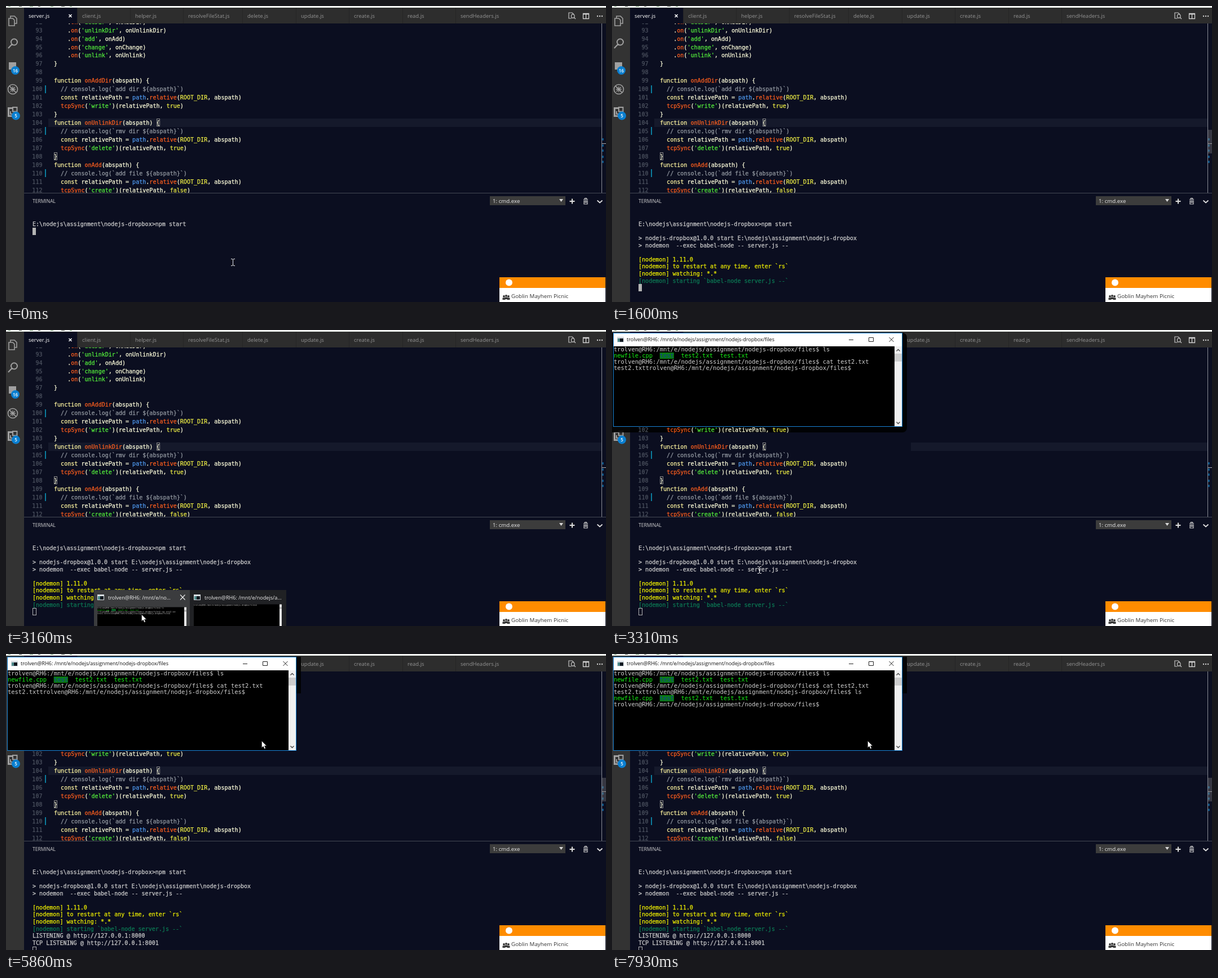
These frames come from a looping animation (1064x526 px, 8 s). An HTML page with a canvas:

```html
<!DOCTYPE html>
<html lang="en">
<head>
<meta charset="utf-8">
<title>Editor and terminal</title>
<style>
html, body { margin: 0; width: 100%; height: 100%; overflow: hidden; background: #0b0e20; }
canvas { display: block; }
</style>
</head>
<body>
<canvas id="stage" width="1064" height="526"></canvas>
<script>
const ctx = document.getElementById('stage').getContext('2d');
const LOOP = 8000;
const MONO = '"DejaVu Sans Mono", "Liberation Mono", monospace';
const SANS = '"Open Sans", "Noto Sans", sans-serif';
const CODE_FONT = '10.05px ' + MONO;
const SHELL_FONT = '10.45px ' + MONO;
const ICON = '#a0a0a0';
const BG = '#0b0e20';

const HOST = 'trolven@RH6:';
const DIR = '/mnt/e/nodejs/assignment/nodejs-dropbox/files';
const PROMPT = HOST + DIR + '$';

const TABS = [['server.js', 32], ['client.js', 127], ['helper.js', 221],
  ['resolveFileStat.js', 315], ['delete.js', 420], ['update.js', 515],
  ['create.js', 609], ['read.js', 704], ['sendHeaders.js', 798]];

const CODE = `    .on('addDir', onAddDir)
    .on('unlinkDir', onUnlinkDir)
    .on('add', onAdd)
    .on('change', onChange)
    .on('unlink', onUnlink)
}

function onAddDir(abspath) {
  // console.log(\`add dir \${abspath}\`)
  const relativePath = path.relative(ROOT_DIR, abspath)
  tcpSync('write')(relativePath, true)
}
function onUnlinkDir(abspath) {
  // console.log(\`rmv dir \${abspath}\`)
  const relativePath = path.relative(ROOT_DIR, abspath)
  tcpSync('delete')(relativePath, true)
}
function onAdd(abspath) {
  // console.log(\`add file \${abspath}\`)
  const relativePath = path.relative(ROOT_DIR, abspath)
  tcpSync('create')(relativePath, false)`.split('\n');

const RULES = [
  [/^\/\/.*/, '#949aa2'],
  [/^'[^']*'/, '#55f03c'],
  [/^(function|const)\b/, '#fff5a0'],
  [/^path\b/, '#4f9af0'],
  [/^(ROOT_DIR|true|false)\b/, '#f0f046'],
  [/^\w+(?=\()/, '#ff5f1e'],
  [/^(\w+|\s+|.)/, '#ffffdc']
];

// Terminal rows: time shown, row, text, colour
const GREY = '#cccccc', YELLOW = '#f0f000';
const ROWS = [
  [0, 0, 'E:\\nodejs\\assignment\\nodejs-dropbox>npm start', GREY],
  [640, 2, '> nodejs-dropbox@1.0.0 start E:\\nodejs\\assignment\\nodejs-dropbox', GREY],
  [640, 3, '> nodemon  --exec babel-node -- server.js --', GREY],
  [1210, 5, '[nodemon] 1.11.0', YELLOW],
  [1210, 6, '[nodemon] to restart at any time, enter `rs`', YELLOW],
  [1210, 7, '[nodemon] watching: *.*', YELLOW],
  [1210, 8, '[nodemon] starting `babel-node server.js --`', '#0c7a55'],
  [4410, 9, 'LISTENING @ http://127.0.0.1:8000', GREY],
  [4410, 10, 'TCP LISTENING @ http://127.0.0.1:8001', GREY]
];
const CURSOR_ROW = [[0, 1], [640, 5], [1210, 9], [4410, 11]];

// Pointer stops: time, shape, x, y
const POINTER = [
  [0, 'beam', 402, 455], [500, 'beam', 356, 390], [640, 'beam', 336, 350],
  [790, 'arrow', 984, 331], [1210, 'beam', 700, 430], [1330, 'beam', 430, 490],
  [1450, 'beam', 364, 512], [1600, ''], [2440, 'arrow', 319, 488],
  [2590, 'arrow', 312, 472], [2730, 'arrow', 267, 473], [2880, 'arrow', 253, 497],
  [3020, 'arrow', 240, 505], [3310, 'beam', 261, 426], [3430, 'beam', 292, 446],
  [3560, 'beam', 330, 470], [3710, 'beam', 336, 515], [4140, 'beam', 480, 400],
  [4270, 'beam', 624, 290], [4410, 'arrow', 520, 107], [4540, 'arrow', 453, 154]
];

// Shell caret: time, column, row (row -1 is hidden)
const CARET = [[0, 0, -1], [3710, 68, 3], [4270, 0, -1], [4850, 68, 3],
  [5860, 0, -1], [6440, 70, 3], [7120, 0, 5], [7260, 59, 5], [7930, 0, -1]];

const at = (list, t) => list.filter(e => e[0] <= t).pop();
const between = (t, a, b) => t >= a && t < b;

function rect(x, y, w, h, color) {
  ctx.fillStyle = color;
  ctx.fillRect(x, y, w, h);
}
function box(x, y, w, h, color) {
  ctx.strokeStyle = color;
  ctx.lineWidth = 1;
  ctx.strokeRect(x + .5, y + .5, w - 1, h - 1);
}
function text(s, x, y, color, font, align = 'left') {
  ctx.font = font;
  ctx.fillStyle = color;
  ctx.textAlign = align;
  ctx.fillText(s, x, Math.round(y));
}
// Monospace text, slightly thickened
function mono(s, x, y, color, font, align) {
  text(s, x, y, color, font, align);
  ctx.strokeStyle = color;
  ctx.lineWidth = .25;
  ctx.strokeText(s, x, Math.round(y));
}
const ui = (s, x, y, color, size) => text(s, x, y, color, size + 'px ' + SANS);
function line(d, color, width = 1) {
  ctx.strokeStyle = color;
  ctx.lineWidth = width;
  ctx.stroke(new Path2D(d));
}
function shape(d, color) {
  ctx.fillStyle = color;
  ctx.fill(new Path2D(d));
}
function disc(x, y, r, color) {
  ctx.fillStyle = color;
  ctx.beginPath();
  ctx.arc(x, y, r, 0, 7);
  ctx.fill();
}
function clipped(x, y, w, h, draw) {
  ctx.save();
  ctx.beginPath();
  ctx.rect(x, y, w, h);
  ctx.clip();
  draw();
  ctx.restore();
}
function badge(n, x, y) {
  disc(x, y, 7.5, '#0a7fd0');
  text(n, x, y + 3, '#fff', '600 8px ' + SANS, 'center');
}

function activityBar() {
  rect(0, 3, 32, 523, '#333333');
  line('M8 22V18H15L19 22V31H15M5 22H12L15 25V35H5Z', ICON, 1.6);
  line('M20 64A5.5 5.5 0 1 1 9 64A5.5 5.5 0 1 1 20 64M10.5 68L4 75', ICON, 2);
  rect(5, 100, 13, 13, ICON);
  badge('16', 16.5, 114.5);
  line('M20.5 148A8.5 8.5 0 1 1 3.5 148A8.5 8.5 0 1 1 20.5 148M6 142L18 154', ICON, 1.6);
  line('M8 144L16 152M7 148H17M12 143V153M8 152L16 144', ICON, 1.3);
  line('M11 181.5H4.5V195.5H18.5V189', ICON, 3);
  line('M12 180H19.5V187.5H12ZM8 187V192H13', ICON, 2);
  badge('5', 17.5, 195);
}

function tabBar() {
  rect(32, 3, 1032, 28, '#252526');
  TABS.forEach(([name, x], i) => {
    const end = i < 8 ? TABS[i + 1][1] : 1065;
    rect(x, 3, end - x - 1, 28, i ? '#2d2d2d' : BG);
    ui(name, x + 8, 21, i ? '#949494' : '#ffffff', 9.5);
  });
  line('M111.5 15L116.5 20M116.5 15L111.5 20', '#fff', 1.5);
  line('M1003 22H998V12H1004L1007 15M1008 18A2.8 2.8 0 1 1 1002.5 18A2.8 2.8 0 1 1 1008 18M1007 20L1010 23', '#c5c5c5', 1.2);
  line('M1023.5 13.5H1033.5V22.5H1023.5ZM1028.5 13V22M1023 14.5H1034', '#d0d0d0', 1.3);
  [1049, 1053, 1057].forEach(x => disc(x, 18, 1.2, '#d0d0d0'));
}

function codeLine(s, x, y) {
  while (s) {
    const [re, color] = RULES.find(r => r[0].test(s));
    const part = s.match(re)[0];
    mono(part, x, y, color, CODE_FONT);
    x += ctx.measureText(part).width;
    s = s.slice(part.length);
  }
}

function editor(t) {
  const hl = between(t, 3310, 3430) ? 530 : 75;
  rect(hl, 200, 1056 - hl, 15, '#15192b');
  clipped(32, 31, 1032, 301, () => {
    CODE.forEach((s, i) => {
      const n = 92 + i, y = 43 + 14.95 * (n - 93);
      mono(n, 64.5, y + 3.6, '#4d5360', CODE_FONT, 'right');
      codeLine(s, 85, y + 3.6);
      if (n % 5 === 0 && n >= 100) rect(69, Math.round(y - 7), 2, 14, '#0c7d9d');
    });
    box(267, 200, 6, 14, '#8a8a8a');
    box(85, 260, 6, 14, '#8a8a8a');
  });
  rect(1056, 31, 1, 301, '#8a8d96');
  [235, 246, 255, 266, 275].forEach(y => rect(1057, y, 3, 4, '#0b4f80'));
  rect(1057, 244, 7, 1, '#b0b0b0');
  if (between(t, 790, 2020) || t >= 3710) rect(1057, 220, 7, 42, 'rgba(121,121,121,.4)');
}

function terminal(t) {
  rect(32, 332, 1032, 1, '#454955');
  ui('TERMINAL', 47, 350, '#d0d0d0', 8.5);
  rect(858, 338, 134, 16, '#3c3c3c');
  ui('1: cmd.exe', 863, 350, '#e8e8e8', 9.7);
  shape('M981 343H988L984.5 348Z', '#d8d8d8');
  line('M999.5 347H1008.5M1004 342.5V351.5', '#e0e0e0', 2);
  line('M1024 343.5H1032M1026.5 343V341.5H1029.5V343M1025 345V352H1031V345M1027 345V350M1029 345V350', '#d0d0d0', 1.2);
  line('M1048.5 345.5L1053 349.5L1057.5 345.5', '#e0e0e0', 1.7);
  for (const [from, row, s, color] of ROWS) {
    if (t >= from) mono(s, 47, 390.7 + 12.6 * row, color, CODE_FONT);
  }
  const y = Math.round(381 + 12.6 * at(CURSOR_ROW, t)[1]);
  if (t < 2020) rect(47, y, 6, 13, '#b4b4b4');
  else box(47, y, 7, 13, '#b4b4b4');
}

function notice() {
  rect(875, 482, 188, 44, '#ffffff');
  rect(875, 482, 188, 19, '#ff8c00');
  disc(892, 491.5, 6, '#ffffff');
  [[883, 516], [891, 516], [887, 515]].forEach(([x, y]) => {
    disc(x, y, 1.9, '#333');
    rect(x - 2.5, y + 2.5, 5, 3.5, '#333');
  });
  ui('Goblin Mayhem Picnic', 896, 519, '#333333', 9.8);
  ui("Think I'll call them at half", 896, 533, '#777777', 9.8);
}

function consoleIcon(x, y) {
  rect(x, y, 12, 10, '#d8dde2');
  rect(x + 1, y + 3, 10, 6, '#101820');
  rect(x + 1, y + 3, 4, 6, '#4f8a8b');
}

function fileList(y) {
  const w = ctx.measureText('M').width;
  rect(3 + 13 * w, y - 8.5, 4 * w, 11, '#0a7d12');
  text('newfile.cpp', 3, y, '#16f016', SHELL_FONT);
  text('test', 3 + 13 * w, y, '#123c9c', SHELL_FONT);
  text('test2.txt  test.txt', 3 + 19 * w, y, '#16f016', SHELL_FONT);
}

function shell(t) {
  const rowY = i => 37.6 + 11 * i;
  const say = (s, i) => text(s, 3, rowY(i), '#d0d0d0', SHELL_FONT);
  say(PROMPT + ' ls', 0);
  fileList(rowY(1));
  say(PROMPT + ' cat test2.txt', 2);
  say('test2.txt' + PROMPT + (t >= 6440 ? ' ls' : ''), 3);
  if (t >= 7120) fileList(rowY(4));
  if (t >= 7260) say(PROMPT, 5);
  const [, col, row] = at(CARET, t);
  if (row >= 0) rect(3 + col * 6.29, 70 + 11 * (row - 3), 6.3, 2, '#c8c8c8');
}

function preview(x, y, w, name, draw) {
  const bar = x + w - 4;
  consoleIcon(x, 470);
  ui(name, x + 19, 478.5, '#f0f0f0', 9.1);
  rect(x, y, w, 526 - y, '#000');
  rect(bar, y, 4, 526 - y, '#e4e4e4');
  rect(bar, y + 5, 4, 3, '#b0b0b0');
  clipped(x, y, w - 4, 526 - y, () => {
    ctx.translate(x - .9, y - 8.9);
    ctx.scale(.307, .307);
    draw();
  });
}

function previews(t) {
  ctx.save();
  if (t < 2440) {
    ctx.globalAlpha = .7;
    ctx.translate(324, 541);
    ctx.scale(.97, .97);
    ctx.translate(-324, -526);
  }
  rect(156, 462, 341, 80, '#202124');
  rect(156, 462, 170, 80, '#3b3c3e');
  if (between(t, 2590, 2730)) rect(297, 461, 29, 27, '#e01b24');
  preview(162, 492.5, 158, HOST + ' /mnt/e/no...', () => shell(0));
  preview(333, 487.5, 156, HOST + ' /mnt/e/nodejs/a...',
    () => text(PROMPT, 3, 37.6, '#d0d0d0', SHELL_FONT));
  line('M309 470.5L317.5 479.5M317.5 470.5L309 479.5', '#f0f0f0', 1.1);
  ctx.restore();
}

function shellShadow(t) {
  const color = 'rgba(0,0,0,.88)';
  if (t < 3430) {
    ctx.fillStyle = color;
    ctx.beginPath();
    ctx.roundRect(-10, 5, 533, 177, 8);
    ctx.fill();
  } else {
    rect(514, 5, 9, (t < 3710 ? 172 : 70) - 5, color);
  }
}

function shellWindow(t) {
  rect(2, 5, 513, 167, '#1883d7');
  rect(3, 6, 511, 23, '#ffffff');
  rect(3, 29, 498, 142, '#000000');
  consoleIcon(9, 12);
  ui(HOST + ' ' + DIR, 26, 20, '#111', 9.02);
  line('M420 17.5H428M455.5 13.5H463.5V20.5H455.5ZM491.5 13L499.5 21M499.5 13L491.5 21', '#222', 1);
  rect(501, 29, 13, 142, '#f0f0f0');
  rect(501, 42, 13, 14, '#cdcdcd');
  line('M504.5 37.5L507.5 34.5L510.5 37.5M504.5 163.5L507.5 166.5L510.5 163.5', '#444', 1.4);
  shell(t);
}

function pointer(t) {
  const [, kind, x, y] = at(POINTER, t);
  if (!kind) return;
  ctx.save();
  ctx.translate(x, y);
  if (kind === 'beam') {
    line('M-3 -5.5H-1L.5 -4.5L2 -5.5H4M.5 -5V6M-3 6.5H-1L.5 5.5L2 6.5H4', '#e8e8e8', 1);
  } else {
    const d = 'M.5 .5V12.5L3.3 10L5.2 14.5L7.3 13.6L5.4 9.2H9Z';
    shape(d, '#fff');
    line(d, '#222', .6);
  }
  ctx.restore();
}

function draw(t) {
  const open = t >= 3310;
  rect(0, 0, 1064, 526, BG);
  rect(0, 0, 1064, 3, '#f1f6f1');
  [4, 23, 42, 57, 79, 98, 113].forEach((x, i) =>
    rect(x, 0, 4 + i % 3, 1, i % 2 ? '#555' : '#6f8f6f'));
  activityBar();
  tabBar();
  if (open) shellShadow(t);
  editor(t);
  terminal(t);
  notice();
  if (between(t, 2290, 3310)) previews(t);
  if (open) shellWindow(t);
  pointer(t);
}

const start = performance.now();
function tick() {
  draw((performance.now() - start) % LOOP);
  requestAnimationFrame(tick);
}
tick();
</script>
</body>
</html>
```
